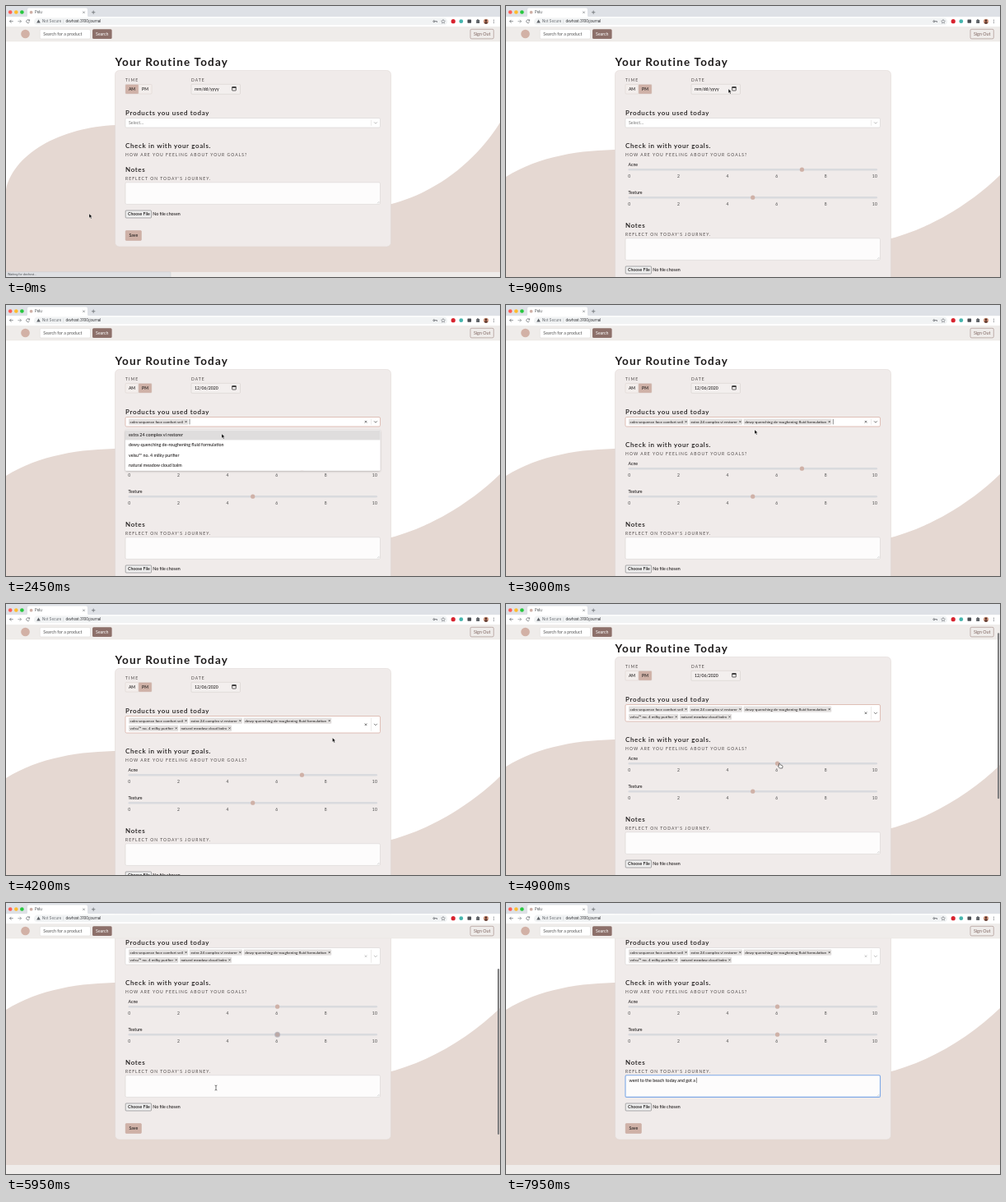
An HTML page that plays this animation: 600x330 px, repeating every 8 s.

```html
<!DOCTYPE html>
<html lang="en">
<head>
<meta charset="utf-8">
<title>Pelu</title>
<style>
  html, body { margin: 0; width: 100%; height: 100%; overflow: hidden; background: #fff; }
  svg { display: block; width: 600px; height: 330px; font-family: Lato, "Open Sans", sans-serif; }
  text { white-space: pre; }
  .ui { font-family: Inter, Roboto, sans-serif; }
</style>
</head>
<body>
<svg id="stage" viewBox="0 0 600 330"></svg>
<script>
const LOOP = 8000;
const INK = '#1d1a1a', ROSE = '#cfb1a7', PAPER = '#f0ebea', NAV = '#efecea', BLUE = '#7fa9e6';
const products = [
  'calm sequence face comfort veil',
  'extra 24 complex vi restorer',
  'dewy-quenching de-roughening fluid formulation',
  'velsu™ no. 4 milky purifier',
  'natural meadow cloud balm'
];
const openTimes = [1800, 2250, 2700, 3200, 3700];
const pickTimes = [2050, 2500, 2900, 3450, 3950];
const note = 'went to the beach today and got a ';

// time, x, y of the pointer
const pointerPath = [
  [0, 101, 253], [250, 104, 250], [620, 168, 101], [740, 168, 101], [930, 277, 101],
  [1100, 277, 101], [1500, 234, 144], [1650, 234, 144], [1850, 234, 146], [2000, 230, 157],
  [2080, 230, 157], [2250, 252, 146], [2450, 262, 157], [2520, 262, 157], [2700, 285, 147],
  [2880, 300, 156], [3000, 302, 152], [3200, 335, 146], [3420, 372, 157], [3480, 372, 157],
  [3700, 384, 150], [3930, 396, 165], [4200, 396.5, 163], [4400, 396, 163], [4680, 361, 194],
  [4730, 361, 194], [4860, 332, 195], [5150, 332, 195], [5480, 301, 160], [5560, 301, 160],
  [5700, 331, 160], [5800, 258, 222], [5950, 255, 225]
];

const measure = document.createElement('canvas').getContext('2d');
const textWidth = (s, size) => {
  measure.font = '100px Lato, "Open Sans", sans-serif';
  return measure.measureText(s).width * size / 100;
};
const ease = (t, from, to) => {
  const p = Math.min(1, Math.max(0, (t - from) / (to - from)));
  return p * p * (3 - 2 * p);
};
const between = (t, from, to) => t >= from && t < to;

const rect = (x, y, w, h, fill, more = '') =>
  `<rect x="${x}" y="${y}" width="${w}" height="${h}" fill="${fill}" ${more}/>`;
const dot = (x, y, r, fill, more = '') => `<circle cx="${x}" cy="${y}" r="${r}" fill="${fill}" ${more}/>`;
const line = (d, color, width = .7, more = '') =>
  `<path d="${d}" fill="none" stroke="${color}" stroke-width="${width}" ${more}/>`;
const text = (x, y, s, size = 5.3, more = '') =>
  `<text x="${x}" y="${y}" font-size="${size}" fill="${INK}" ${more}>${s}</text>`;
const ui = (x, y, s, size, color) => text(x, y, s, size, `class="ui" style="fill:${color}"`);
const heading = (y, s) => text(145, y, s, 8, 'font-weight="600" letter-spacing=".65"');
const label = (x, y, s) => text(x, y, s, 5, 'letter-spacing="1.06" style="fill:#4f4948"');
const border = (color, r = 1, w = .5) => `stroke="${color}" stroke-width="${w}" rx="${r}"`;
const cross = (x, y, r, color, w) =>
  line(`M${x - r} ${y - r}l${2 * r} ${2 * r}m0 ${-2 * r}l${-2 * r} ${2 * r}`, color, w);

function pointerAt(t) {
  const next = pointerPath.findIndex(key => key[0] > t);
  if (next < 0) return pointerPath.at(-1).slice(1);
  const [t0, x0, y0] = pointerPath[next - 1], [t1, x1, y1] = pointerPath[next];
  const p = ease(t, t0, t1);
  return [x0 + (x1 - x0) * p, y0 + (y1 - y0) * p];
}

function stateAt(t) {
  const picked = pickTimes.filter(p => t >= p).length;
  const loaded = t >= 200;
  const wrap = picked > 3 ? 9 : 0;
  return {
    t, picked, loaded, wrap,
    grow: loaded ? 68 + wrap : 0,
    scroll: 14 * ease(t, 4350, 4650) + 68 * ease(t, 5150, 5480),
    open: picked < 5 && t >= openTimes[picked],
    focused: between(t, 1900, 5500),
    evening: t >= 700,
    dateFocus: between(t, 950, 1900),
    dated: t >= 1620,
    calendar: between(t, 980, 1620),
    acne: t < 4790 ? 7 : 6,
    texture: t < 5640 ? 5 : 6,
    noteFocus: t >= 6150,
    typed: note.slice(0, Math.floor(note.length * Math.max(0, t - 6500) / 1430))
  };
}

function backdrop({ loaded, wrap, grow }) {
  const wave = loaded
    ? 'M0 208C40 183 90 175 140 175L460 285C515 272 565 240 600 206V420H0Z'
    : 'M-1 229C5 180 70 145 140 145L460 243C520 230 570 190 600 142V340H0Z';
  return `<path d="${wave}" fill="#e5d8d2" transform="translate(0 ${wrap * .45})"/>`
    + rect(0, 324 + grow, 600, 60, NAV);
}

function timeAndDate({ evening, dateFocus, dated }) {
  const half = (x, s, on) => rect(x, 95.5, 16, 11.5, on ? ROSE : '#f3eeec', border('#d8cfcb'))
    + text(x + 8, 103.2, s, 5.1, 'text-anchor="middle" font-weight="500"');
  return label(145, 92.3, 'TIME') + half(145, 'AM', !evening) + half(161, 'PM', evening)
    + label(225, 92.3, 'DATE')
    + rect(225, 95.3, 59.5, 12, dateFocus ? '#fbf9f8' : '#f3efee', dateFocus ? border(BLUE, 1, 1) : border('#cfc8c5'))
    + text(229, 103.2, dated ? '12/06/2020' : 'mm/dd/yyyy', 5.2, 'font-weight="500"')
    + rect(274.7, 98.8, 4.6, 4.2, 'none', border('#222', .4, .7)) + rect(274.5, 98.3, 5, 1.5, '#222');
}

function calendar() {
  let out = rect(225, 108.5, 88, 90, '#fff', 'stroke="#c8c8c8" stroke-width=".5" filter="url(#shadow)"')
    + text(230, 117, 'December 2020 ▾', 5, 'font-weight="600"')
    + line('M297 118v-5m-1.8 1.8l1.8 -1.8l1.8 1.8M305 113v5m-1.8 -1.8l1.8 1.8l1.8 -1.8', '#444', .6);
  const cell = (col, y, s, color) =>
    text(234 + col * 11.6, y, s, 4.6, `text-anchor="middle" style="fill:${color}"`);
  [...'SMTWTFS'].forEach((day, col) => out += cell(col, 127, day, '#777'));
  out += rect(229, 140.5, 10, 9, '#1a73e8', 'rx="1"');
  for (let i = 0; i < 35; i++) {
    const day = i < 2 ? 29 + i : i < 33 ? i - 1 : i - 32;
    const color = i === 7 ? '#fff' : i < 2 || i > 32 ? '#aaa' : '#222';
    out += cell(i % 7, 136.8 + Math.floor(i / 7) * 10, day, color);
  }
  return out + text(230, 193, 'Today', 5, 'style="fill:#1a73e8"');
}

function productSelect({ t, picked, wrap, open, focused }) {
  const bottom = 148 + wrap, mid = (136.5 + bottom) / 2;
  let out = heading(132.5, 'Products you used today')
    + rect(145, 136.5, 309.5, bottom - 136.5, '#fff', focused ? border('#d5a89c', 1.5, .7) : border('#cfcbca', 1.5));
  let x = 149, y = 138.6;
  products.slice(0, picked).forEach((name, i) => {
    if (i === 3) { x = 149; y += 9.2; }
    const w = textWidth(name, 4.6) + 7.6;
    out += rect(x, y, w, 7.2, '#e3e0df', 'rx=".8"') + text(x + 1.6, y + 5.1, name, 4.6)
      + cross(x + w - 2.6, y + 3.6, 1, '#333', .7);
    x += w + 1.6;
  });
  if (!picked) out += text(149, 144.3, 'Select...', 5.3, 'style="fill:#777"');
  const since = t - Math.max(1800, ...pickTimes.filter(p => p <= t));
  if (between(t, 1800, 4100) && since % 1000 < 500) out += rect(x, y + .4, .5, 6.4, '#222');
  if (picked) out += cross(437, mid, 1.3, focused ? '#555' : '#bbb', .8);
  out += rect(443.3, 138.8, .4, bottom - 141, '#d0cccb')
    + line(`M447 ${mid - .9}l1.9 1.9l1.9 -1.9`, focused ? '#555' : '#aaa', .8);
  return out;
}

function menu({ picked, wrap }) {
  const left = products.slice(picked), top = 152 + wrap;
  return rect(145, top, 309.5, left.length * 12.25 + .8, '#fff', 'rx="1.5" filter="url(#shadow)"')
    + rect(145, top + .4, 309.5, 12, '#dfdddd')
    + left.map((name, i) => text(149, top + 8 + i * 12.25, name, 5.35, 'font-weight="500"')).join('');
}

function slider(y, name, value, halo) {
  const x = 150.5 + value * 29.85;
  let out = text(148.5, y - 4.7, name, 5.2, 'font-weight="500"')
    + rect(148.5, y - 1.2, 302.5, 2.4, '#d9dade', 'rx="1.2"')
    + (halo ? dot(x, y, 3.5, '#a9adb8', 'opacity=".7"') : '')
    + dot(x, y, 2.6, halo ? '#bba9a6' : ROSE);
  for (let n = 0; n <= 10; n += 2)
    out += text(150 + n * 29.8, y + 9.4, n, 5, 'text-anchor="middle" letter-spacing=".4" style="fill:#444"');
  return out;
}

function goals({ t, loaded, acne, texture }) {
  return heading(173, 'Check in with your goals.')
    + label(145, 182.7, 'HOW ARE YOU FEELING ABOUT YOUR GOALS?')
    + (loaded ? slider(199.2, 'Acne', acne, between(t, 4720, 4860))
      + slider(233.2, 'Texture', texture, between(t, 5540, 6150)) : '');
}

function notes({ t, noteFocus, typed }) {
  const caretX = 149.5 + textWidth(typed, 5.37);
  const caret = noteFocus && (typed || (t - 6150) % 1000 < 500);
  return heading(202.3, 'Notes') + label(145, 212, "REFLECT ON TODAY'S JOURNEY.")
    + rect(145, 214.8, 309.5, 26.6, '#fdfcfc', noteFocus ? border(BLUE, 1.5, 1.1) : border('#d2cdcb', 1.5))
    + line('M451 240.3l2.4 -2.4M452.6 240.3l.8 -.8', '#999', .4)
    + text(149.5, 222.8, typed, 5.37, 'font-weight="500"')
    + (caret ? rect(caretX, 217.7, .5, 6.4, '#222') : '')
    + rect(145.2, 249, 31.3, 9, '#efefef', border('#77777a', .8, .6))
    + text(148, 255.4, 'Choose File', 5.2, 'font-weight="600"')
    + text(178.3, 255.4, 'No file chosen', 5.3, 'font-weight="500"')
    + rect(145.2, 273.5, 19.2, 12, ROSE, border('#c4a398'))
    + text(154.8, 281.4, 'Save', 5.2, 'text-anchor="middle" font-weight="500"');
}

function page(s) {
  const shift = (dy, content) => `<g transform="translate(0 ${dy})">${content}</g>`;
  return shift(-s.scroll, backdrop(s)
    + text(132.5, 73, 'Your Routine Today', 13.5, 'font-weight="700" letter-spacing="1.2"')
    + rect(132.5, 78.5, 335, 214.5 + s.grow, PAPER, border('#dcd4d1', 5))
    + timeAndDate(s) + productSelect(s)
    + shift(s.wrap, goals(s)) + shift(s.grow, notes(s))
    + (s.open ? menu(s) : '') + (s.calendar ? calendar() : ''));
}

function browser() {
  const grey = '#5f6368';
  return rect(0, 0, 600, 13.5, '#dee1e6')
    + dot(5.2, 7.5, 2.3, '#fe5f57') + dot(12.3, 7.5, 2.3, '#febc2e') + dot(19.4, 7.5, 2.3, '#28c840')
    + '<path d="M24 13.5q2 0 2 -2v-7q0 -2 2 -2h69q2 0 2 2v7q0 2 2 2z" fill="#fff"/>'
    + dot(30.6, 7.7, 1.9, ROSE) + ui(35, 9.3, 'Pelu', 4.3, '#3c4043')
    + cross(94.5, 7.7, 1.2, grey, .6) + line('M106.2 5.5v4.4m-2.2 -2.2h4.4', grey)
    + rect(0, 13.2, 600, 12, '#fff')
    + line('M8.7 18.7h-4.2m1.9 -1.9l-1.9 1.9l1.9 1.9', grey)
    + line('M14.4 18.7h4.2m-1.9 -1.9l1.9 1.9l-1.9 1.9', '#85888c')
    + line('M28.4 17.6a2 2 0 1 0 .1 2m.1 -3.2v1.6h-1.6', grey)
    + rect(34, 14.5, 502, 8.8, '#f1f3f4', 'rx="4.4"')
    + '<path d="M39.5 16.6l2.3 4h-4.6z" fill="#5f6368"/>'
    + ui(44, 20.3, 'Not Secure', 4.4, grey) + rect(69.5, 16.5, .4, 4.6, '#c0c3c7')
    + ui(72.5, 20.3, 'devhost:3100/journal', 4.3, '#202124')
    + dot(519.8, 18.7, 1, 'none', `stroke="${grey}" stroke-width=".8"`) + line('M520.8 18.7h2.7v1.2', grey, .8)
    + '<path d="M531 16.4l.7 1.5l1.7 .2l-1.2 1.2l.3 1.7l-1.5 -.8l-1.5 .8l.3 -1.7l-1.2 -1.2l1.7 -.2z" fill="none" stroke="#5f6368" stroke-width=".5"/>'
    + dot(543.2, 18.7, 2.6, '#d8232f') + dot(552.8, 18.7, 2.4, '#45b5ad')
    + rect(560.5, 16.5, 4.6, 4.2, '#4a4d52', 'rx=".6"') + rect(571.2, 17, 4, 4, grey, 'rx=".6"') + dot(573, 17, .9, grey)
    + dot(583, 18.7, 3, '#c98b72') + dot(583, 17.8, 1.2, '#4b2c25') + '<path d="M580.8 20.7q2.2 -3 4.4 0q-2.2 2 -4.4 0" fill="#4b2c25"/>'
    + [17, 18.7, 20.4].map(y => dot(592.5, y, .5, grey)).join('');
}

function navBar() {
  return rect(0, 25, 600, 18, NAV) + rect(0, 24.8, 600, .4, '#dcdcdc') + rect(0, 42.8, 600, .4, '#e4dfdc')
    + dot(23.5, 34, 5.3, '#d2b1a6')
    + rect(41.2, 28.6, 61.3, 11.4, '#fff', border('#d9d4d2', 1.5)) + text(45.3, 36, 'Search for a product', 5.3, 'style="fill:#555"')
    + rect(105, 28.3, 23.6, 11.8, '#8d706a', 'rx="1.5"') + text(116.8, 36, 'Search', 5.25, 'text-anchor="middle" style="fill:#fff"')
    + rect(564, 28.3, 28.3, 11.6, 'none', border('#8d706a', 1.5)) + text(578.2, 36, 'Sign Out', 5.4, 'text-anchor="middle" style="fill:#7d645f"');
}

function overlays({ t, loaded, scroll }) {
  const opacity = t < 4350 ? 0 : 1 - ease(t, 5970, 6200);
  return (opacity ? rect(597, 26 + scroll * .66, 2.2, 202, '#7f7f80', `rx="1.1" opacity="${opacity}"`) : '')
    + (loaded ? '' : rect(0, 323.7, 200, 7, '#dfe0e3', border('#c3c4c7', 1, .4)) + ui(2, 328.3, 'Waiting for devhost...', 3.5, '#44474b'));
}

function pointer(t) {
  if (t > 6500) return '';
  const [x, y] = pointerAt(t);
  const shape = t >= 5780
    ? line('M-1.4 -3q1.4 0 1.4 1q0 -1 1.4 -1M0 -2v4M-1.4 3q1.4 0 1.4 -1q0 1 1.4 1', '#222', .6)
    : t >= 4650
      ? '<path d="M-.4 -.7q.7 -.7 1.2 .2l.6 1.6l1.8 .4q1 .4 .8 1.5l-.4 2h-3.2l-2 -2.5q0 -.8 1.1 -.3z" fill="#fff" stroke="#111" stroke-width=".55"/>'
      : '<path d="M0 0v5l1.2 -1.1l.9 2l.9 -.4l-.9 -1.9h1.6z" fill="#000" stroke="#fff" stroke-width=".35"/>';
  return `<g transform="translate(${x} ${y})">${shape}</g>`;
}

const defs = '<defs><filter id="shadow" x="-5%" y="-10%" width="110%" height="125%">'
  + '<feDropShadow dx="0" dy=".8" stdDeviation=".9" flood-opacity=".28"/></filter></defs>';
const stage = document.getElementById('stage');
const start = performance.now();

function render() {
  const s = stateAt((performance.now() - start) % LOOP);
  stage.innerHTML = defs + page(s) + navBar() + browser() + overlays(s) + pointer(s.t);
  requestAnimationFrame(render);
}
render();
</script>
</body>
</html>
```
